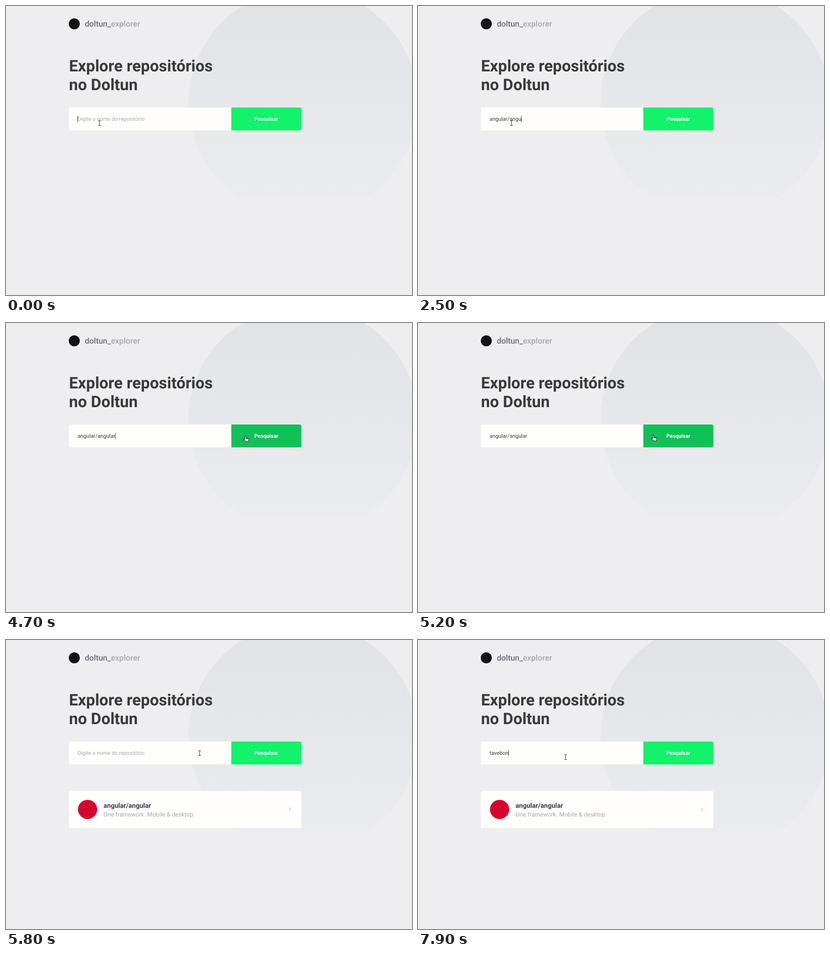
Recreate the animation shown at these times as an HTML page. Size 886 by 632 pixels, loop 8 s.

```html
<!DOCTYPE html>
<html lang="pt-BR">
<head>
<meta charset="utf-8">
<title>Explorador de repositórios</title>
<style>
  html, body { margin: 0; width: 100%; height: 100%; overflow: hidden; background: #eeeef0; }
  svg { display: block; width: 886px; height: 632px; }
  text { font-family: Roboto, sans-serif; text-rendering: geometricPrecision; white-space: pre; }
  .brand { font-size: 17.38px; font-weight: 500; fill: #6c6c76; }
  .title { font-size: 34.8px; font-weight: 700; fill: #3a3a3a; }
  .field { font-size: 11.6px; fill: #3a3a3a; }
  .muted { fill: #a8a8ae; }
  .label { font-size: 11.6px; font-weight: 700; fill: #fff; text-anchor: middle; }
  .repo { font-size: 14.48px; font-weight: 700; fill: #3d3d4d; }
  .about { font-size: 13.03px; }
  .panel { fill: #fffefd; }
</style>
</head>
<body>
<svg viewBox="0 0 886 632">
  <defs>
    <linearGradient id="shade" gradientUnits="userSpaceOnUse" x1="0" y1="0" x2="0" y2="420">
      <stop offset="0" stop-color="#e2e3e5"/>
      <stop offset="1" stop-color="#ebecf0"/>
    </linearGradient>
    <clipPath id="top"><rect width="886" height="420"/></clipPath>
  </defs>
  <circle cx="648.5" cy="211.5" r="250" fill="url(#shade)" clip-path="url(#top)"/>

  <circle cx="149" cy="39" r="12" fill="#121214"/>
  <text class="brand" x="172" y="45">doltun_<tspan class="muted">explorer</tspan></text>
  <text class="title" x="137.5" y="143.2">Explore repositórios</text>
  <text class="title" x="137.5" y="184">no Doltun</text>

  <rect class="panel" x="137.5" y="222" width="365" height="50" rx="3.6"/>
  <path id="button" d="M491.7 222H641a3.6 3.6 0 0 1 3.6 3.6V268.4a3.6 3.6 0 0 1-3.6 3.6H491.7Z"/>
  <text class="label" x="568.2" y="251">Pesquisar</text>
  <text class="field muted" id="hint" x="156.3" y="251">Digite o nome do repositório</text>
  <text class="field" id="typed" x="156.3" y="251"></text>
  <rect id="caret" y="240" width="1" height="14" fill="#3a3a3a"/>

  <g id="card">
    <rect class="panel" x="137.5" y="330.2" width="507" height="80.8" rx="3.6"/>
    <circle cx="178" cy="370.5" r="21" fill="#d5042f"/>
    <text class="repo" x="212.8" y="367">angular/angular</text>
    <text class="about muted" x="212.8" y="385.6">One framework. Mobile &amp; desktop.</text>
    <path d="M617.6 366.6l3.9 3.9-3.9 3.9" fill="none" stroke="#c6c6cd" stroke-width="1.4"/>
  </g>

  <g id="pointer">
    <path id="beam" fill="none" stroke="#333" stroke-width="1.1"
      d="M-3-5.2H-1Q0-5.2 0-4V4Q0 5.2-1 5.2H-3M3-5.2H1Q0-5.2 0-4M0 4Q0 5.2 1 5.2H3"/>
    <path id="hand" fill="#fff" stroke="#222" stroke-width="1.1" stroke-linejoin="round"
      d="M-3 1V-5.2a1.2 1.2 0 0 1 2.4 0V-1.5L4-.6Q6-.2 6 1.5Q6 4 4.5 6.3H-1.5Q-3 3.5-6 1.5Q-6.3 0-4.8.1L-3 1.4ZM1.4-1V1M3.7-.5V1.2"/>
  </g>
</svg>
<script>
const LOOP = 8000, STEP = 100, BLINK = 550;
const BLUR = 5100, RESULT = 5400, FOCUS = 6000, RETYPE = 7100;
const $ = id => document.getElementById(id);
const [button, hint, typed, caret, card, pointer, beam, hand] =
  ['button', 'hint', 'typed', 'caret', 'card', 'pointer', 'beam', 'hand'].map($);

// Typing bursts as [time, letters so far]; an even pace joins them.
const queries = [
  { text: 'angular/angular', pace: [[400, 0], [800, 4], [1400, 7], [1800, 8], [2100, 10], [2900, 14], [3300, 15]] },
  { text: 'tavebon', pace: [[7000, 0], [RETYPE, 2], [7400, 4], [7600, 4], [7900, 7]] }
];
// Pointer path as [time, x, y]
const path = [[4200, 204, 256], [4500, 474, 257], [4700, 524, 253], [RESULT, 513, 251],
  [5500, 513, 251], [5800, 422.5, 247.5], [FOCUS, 322, 256]];

const clamp = v => Math.min(1, Math.max(0, v));
const linear = p => p;
const smooth = p => p * p * (3 - 2 * p);
const mix = (a, b, k) => a.map((v, i) => v + (b[i] - v) * k);
const show = (el, on) => el.style.display = on ? '' : 'none';

// Values at time t on a track of [time, ...values]
function along(track, t, ease) {
  const next = Math.max(1, track.findIndex(k => k[0] > t));
  const end = t >= track.at(-1)[0] ? track.length - 1 : next;
  const [t0, ...a] = track[end - 1], [t1, ...b] = track[end];
  return mix(a, b, ease(clamp((t - t0) / (t1 - t0))));
}

// The caret stays solid while typing and blinks when idle.
function caretOn(t) {
  const idle = t < FOCUS ? Math.max(0, t - 3150) : t < RETYPE ? t - FOCUS : 0;
  const focused = t < BLUR || t >= FOCUS;
  return focused && Math.floor(idle / BLINK) % 2 === 0;
}

function render(t) {
  const { text, pace } = queries[t < RESULT ? 0 : 1];
  const count = Math.floor(along(pace, t, linear)[0] + 1e-6);
  typed.textContent = text.slice(0, count);
  show(hint, !count);
  show(caret, caretOn(t));
  caret.setAttribute('x', Math.floor(156.3 + (count ? typed.getComputedTextLength() : 0)));
  show(card, t >= RESULT);

  const [x, y] = along(path, t, smooth);
  const hover = clamp((x - 480) / 30);
  const color = mix([18, 242, 107], [16, 193, 88], hover).map(Math.round);
  button.setAttribute('fill', `rgb(${color})`);
  pointer.setAttribute('transform', `translate(${x} ${y})`);
  show(beam, x < 470);
  show(hand, x >= 470);
}

const start = performance.now();
function tick() {
  const t = (performance.now() - start) % LOOP;
  render(Math.floor(t / STEP) * STEP);
  requestAnimationFrame(tick);
}
tick();
</script>
</body>
</html>
```
